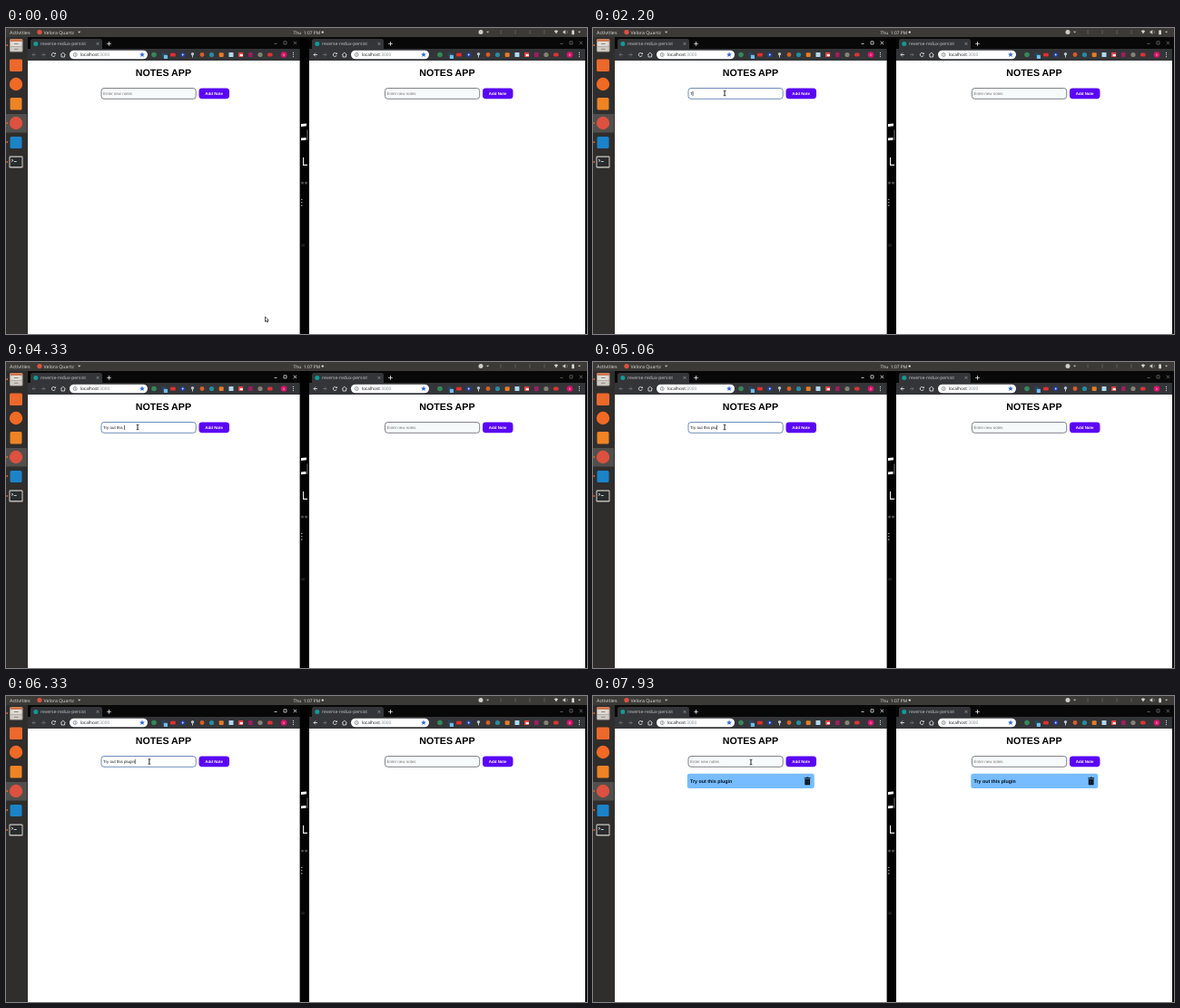
These frames come from a looping animation (640 by 338 pixels, 8000 ms). An HTML page with a canvas:

```html
<!DOCTYPE html>
<html lang="en">
<head>
<meta charset="utf-8">
<title>Notes app</title>
<style>
html, body { margin: 0; width: 100%; height: 100%; overflow: hidden; background: #000; }
canvas { display: block; width: 100vw; height: 100vh; }
</style>
</head>
<body>
<canvas id="stage"></canvas>
<script>
const W = 640, H = 338, LOOP = 8000;
const canvas = document.getElementById('stage');
const ctx = canvas.getContext('2d');
const UI = '"Noto Sans", sans-serif';
const PAGE = '"Liberation Sans", Arial, sans-serif';

const NOTE = 'Try out this plugin';
const KEYS = [2200, 2400, 2600, 2730, 3000, 3130, 3330, 3530, 3730, 3860,
  4000, 4130, 4260, 4600, 4800, 5060, 5400, 5800, 6130];
const FOCUS = 1200, ADDED = 7200;

// Pointer legs: start time, end time, from, to
const LEGS = [
  [60, 860, 285.5, 319, 145, 72],
  [6200, 6760, 145, 72, 238, 75.5],
  [7400, 7930, 238, 75.5, 174, 73]
];

function rect(x, y, w, h, color) {
  ctx.fillStyle = color;
  ctx.fillRect(x, y, w, h);
}

function round(x, y, w, h, r, fill, stroke, lw = 1) {
  ctx.beginPath();
  ctx.roundRect(x, y, w, h, r);
  if (fill) { ctx.fillStyle = fill; ctx.fill(); }
  if (stroke) { ctx.strokeStyle = stroke; ctx.lineWidth = lw; ctx.stroke(); }
}

function disc(x, y, r, color) {
  ctx.beginPath();
  ctx.arc(x, y, r, 0, Math.PI * 2);
  ctx.fillStyle = color;
  ctx.fill();
}

function arc(x, y, r, color, lw, from = 0, to = Math.PI * 2) {
  ctx.beginPath();
  ctx.arc(x, y, r, from, to);
  ctx.strokeStyle = color;
  ctx.lineWidth = lw;
  ctx.stroke();
}

function line(color, lw, ...p) {
  ctx.beginPath();
  for (let i = 0; i < p.length; i += 2) ctx.lineTo(p[i], p[i + 1]);
  ctx.strokeStyle = color;
  ctx.lineWidth = lw;
  ctx.stroke();
}

function poly(color, ...p) {
  ctx.beginPath();
  for (let i = 0; i < p.length; i += 2) ctx.lineTo(p[i], p[i + 1]);
  ctx.closePath();
  ctx.fillStyle = color;
  ctx.fill();
}

function outline(color, lw) {
  ctx.strokeStyle = color;
  ctx.lineWidth = lw;
  ctx.stroke();
}

function text(s, x, y, size, color, font = UI, weight = 400) {
  ctx.font = `${weight} ${size}px ${font}`;
  ctx.fillStyle = color;
  ctx.fillText(s, x, y);
  return ctx.measureText(s).width;
}

function topBar() {
  rect(0, 0, W, 10, '#3b3a36');
  text('Activities', 4, 6.5, 5.4, '#d6d4d0');
  disc(37, 4.6, 2.7, '#dc5140');
  text('Velora Quartz', 41.5, 6.5, 5.2, '#d6d4d0');
  poly('#c4c2bd', 79, 3.7, 82.4, 3.7, 80.7, 5.7);
  text('Thu  1:07 PM', 316.5, 6.5, 4.9, '#dedcd8');
  disc(348.8, 4.6, 1.2, '#dedcd8');
  disc(523, 4.5, 2.5, '#cfcdc8');
  poly('#c4c2bd', 529, 3.7, 532.2, 3.7, 530.6, 5.6);
  for (let x = 545; x < 595; x += 16) {
    line('#55544f', 0.7, x - 1, 3, x + 1, 6, x, 7, x, 2, x + 1, 3, x - 1, 6);
  }
  poly('#d2d0cb', 603.8, 3.2, 606, 2.2, 608.2, 3.2, 606, 6.6);
  poly('#d2d0cb', 613.5, 3.6, 614.7, 3.6, 616.3, 2.1, 616.3, 6.9, 614.7, 5.5, 613.5, 5.5);
  line('#a9a7a2', 0.6, 618, 3.2, 618.6, 4.5, 618, 5.8);
  round(623.2, 2.8, 2.8, 4.4, 0.5, '#d2d0cb');
  rect(624, 2, 1.2, 0.8, '#d2d0cb');
  poly('#c4c2bd', 630, 3.7, 633.2, 3.7, 631.6, 5.6);
}

function dock() {
  rect(0, 10, 24, H - 10, '#2f2e2d');
  rect(0, 95, 23, 20.5, '#514f4c');
  // file drawer
  round(4, 12, 14.5, 14.5, 1.5, '#a9a49c');
  rect(4.5, 12.5, 13.5, 2, '#e46b38');
  round(5, 15, 12.5, 5, 0.7, '#dedad4');
  round(5, 20.8, 12.5, 5, 0.7, '#d0cbc4');
  rect(9, 17, 4.5, 1, '#8c8780');
  rect(9, 22.8, 4.5, 1, '#8c8780');
  // launchers
  round(4, 34.5, 14, 13.5, 1.5, '#ec682b');
  disc(11, 62, 7.2, '#f06a24');
  round(4.5, 77, 13, 13.5, 1.5, '#ee8424');
  disc(11, 105, 7.2, '#dc5140');
  round(4.5, 120, 13, 13, 1.5, '#1c83c9');
  // terminal
  round(3.5, 141.5, 15, 13, 1.2, '#d5d2cd');
  rect(4.5, 142.7, 13, 10.5, '#292c2d');
  line('#eee', 0.8, 6, 145, 7.8, 146.3, 6, 147.6);
  rect(8.7, 147.2, 3, 0.8, '#eee');
  for (const y of [19, 105, 126, 148]) disc(1.2, y, 1, '#e2602c');
}

// Sliver of the window behind, visible between the two browsers
function gap() {
  rect(324, 10, 10, H - 10, '#020202');
  poly('#fff', 325, 106, 331, 105.5, 331, 108.3, 325, 109);
  poly('#fff', 325, 121.5, 330.5, 121, 330.5, 123.8, 325, 124.3);
  rect(331.6, 112.5, 0.8, 11.5, '#858585');
  line('#f4f4f4', 1.1, 327.6, 143, 327.6, 151.4, 332, 151.4);
  round(325, 169.8, 3, 2.8, 1, '#4a4a4a');
  round(329, 169.8, 3, 2.8, 1, '#4a4a4a');
  for (let y = 189.5; y < 198; y += 3.3) disc(325.8, y, 0.8, '#a9a9a9');
  rect(325, 238.5, 4, 3, '#1c1c1c');
}

function star(x, y, r, color) {
  ctx.beginPath();
  for (let i = 0; i < 10; i++) {
    const a = i * Math.PI / 5 - Math.PI / 2, q = i % 2 ? r * 0.45 : r;
    ctx.lineTo(x + q * Math.cos(a), y + q * Math.sin(a));
  }
  ctx.fillStyle = color;
  ctx.fill();
}

function extensions(d) {
  const y = 29.5;
  disc(163 + d, y, 2.8, '#35875a');
  round(171.5 + d, 27, 4, 4, 0.5, '#25455c');
  round(173.8 + d, 29.8, 4.2, 4.2, 0.6, '#6cbcf0');
  round(181 + d, 27.8, 5.8, 3.8, 0.8, '#df3030');
  disc(194.7 + d, y, 2.6, '#2440aa');
  disc(194.7 + d, y, 0.9, '#d6e0ff');
  disc(205.5 + d, 28.7, 1.7, '#b7c2cc');
  rect(205 + d, 29.5, 1, 3, '#b7c2cc');
  disc(216 + d, y, 2.4, '#d95d27');
  disc(226.5 + d, y, 2.6, '#278ba0');
  round(234.7 + d, 27.2, 5, 4.7, 1, '#e37d26');
  round(245.5 + d, 27, 5, 5, 0.6, '#b0d8ed');
  round(256 + d, 27, 5.2, 5, 0.6, '#e84444');
  rect(257.7 + d, 29, 3.1, 2.2, '#fff');
  round(267 + d, 27, 4.6, 5, 0.6, '#a01c5f');
  disc(280 + d, y, 2.6, '#868174');
  round(288 + d, 27.6, 5.6, 4, 1.5, '#dc3434');
}

function browser(right, active) {
  const d = right ? 310 : 0, e = right ? 315 : 0;
  const x0 = right ? 334 : 24, x1 = right ? 638 : 323.6;
  rect(x0, 10, x1 - x0, 13.5, '#080808');
  // tab
  round(27 + d, 12, 79, 13, [2.5, 2.5, 0, 0], '#343538');
  disc(32.8 + d, 17.4, 2.5, '#119b98');
  text('reverse-redux-persist', 38 + d, 19.3, 5, '#bfc1c4');
  line('#a8aaad', 0.6, 99.5 + d, 15.9, 102.5 + d, 18.9);
  line('#a8aaad', 0.6, 102.5 + d, 15.9, 99.5 + d, 18.9);
  line('#ededed', 0.8, 111.2 + d, 17.4, 115.8 + d, 17.4);
  line('#ededed', 0.8, 113.5 + d, 15.1, 113.5 + d, 19.7);
  // window buttons
  const c = active ? '#f2f2f2' : '#77787a';
  line(c, 0.8, 295.5 + e, 17.4, 298.5 + e, 17.4);
  round(306 + e, 14.8, 3, 3.2, 0, null, c, 0.7);
  line(c, 0.8, 316.7 + e, 14.8, 320 + e, 18.1);
  line(c, 0.8, 320 + e, 14.8, 316.7 + e, 18.1);
  // toolbar
  rect(x0, 23, x1 - x0, 13.2, '#343538');
  const back = right ? '#ececec' : '#707174';
  line(back, 0.8, 33 + d, 29.5, 29 + d, 29.5, 31 + d, 27.5);
  line(back, 0.8, 29 + d, 29.5, 31 + d, 31.5);
  line('#707174', 0.8, 39 + d, 29.5, 43 + d, 29.5, 41 + d, 27.5);
  line('#707174', 0.8, 43 + d, 29.5, 41 + d, 31.5);
  arc(52.3 + d, 29.5, 2, '#ececec', 0.8, 0.3, 5.4);
  poly('#ececec', 54.8 + d, 27, 54.8 + d, 29, 52.8 + d, 29);
  line('#ececec', 0.8, 60 + d, 29.7, 62.8 + d, 27.2, 65.6 + d, 29.7);
  line('#ececec', 0.8, 61 + d, 29.4, 61 + d, 32, 64.6 + d, 32, 64.6 + d, 29.4);
  // address bar
  round(70 + d, 24.7, 86, 9.6, 4.8, '#fff');
  arc(76.2 + d, 29.5, 2, '#5f6368', 0.6);
  rect(75.9 + d, 28.4, 0.6, 2.2, '#5f6368');
  const w = text('localhost', 81.7 + d, 31.2, 4.8, '#202124');
  text(':3000', 81.7 + d + w, 31.2, 4.8, '#8a8d91');
  star(150 + d, 29.5, 3, '#3166d8');
  extensions(e);
  disc(306 + e, 29.5, 3.3, '#d9146c');
  text('A', 304.8 + e, 30.9, 3.8, '#f6c7dc');
  for (let y = 27.4; y < 32; y += 2.1) disc(316.5 + e, y, 0.6, '#e4e4e4');
  rect(x0, 36, x1 - x0, H - 36, '#fff');
}

function trash(x, y) {
  rect(x - 1.2, y, 2.4, 1, '#08131e');
  rect(x - 3.4, y + 0.6, 6.8, 1.1, '#08131e');
  round(x - 2.9, y + 2.2, 5.8, 6.5, [0, 0, 0.9, 0.9], '#08131e');
  for (const k of [-1.4, 0, 1.4]) rect(x + k - 0.15, y + 3.3, 0.3, 4.3, '#365779');
}

function page(dx, value, focused, caret, added) {
  ctx.save();
  ctx.translate(dx, 0);
  text('NOTES APP', 142.8, 52.8, 10.67, '#000', PAGE, 700);
  round(105, 66.5, 104.2, 11.8, 3, focused ? '#fff' : '#f7fafb', focused ? '#4a70a8' : '#606369', 0.8);
  const w = text(value || 'Enter new notes', 107, 74, 4.45, value ? '#181818' : '#777', PAGE);
  if (caret) rect(107 + (value ? w : 0), 69.8, 0.6, 5.2, '#111');
  round(212.5, 66.6, 33.5, 11.6, 3.4, '#5a05f5');
  text('Add Note', 219.3, 74, 4.45, '#fff', PAGE, 700);
  if (added) {
    round(103.8, 85.7, 140, 16.4, 2.5, '#76bcff');
    text(NOTE, 107, 95.8, 5.33, '#07111b', PAGE, 700);
    trash(236.2, 89.6);
  }
  ctx.restore();
}

function pointerAt(t) {
  let pos = [LEGS[0][2], LEGS[0][3]];
  for (const [a, b, x, y, u, v] of LEGS) {
    if (t < a) break;
    const p = Math.min(1, (t - a) / (b - a));
    const k = p * p * (3 - 2 * p);
    pos = [x + (u - x) * k, y + (v - y) * k];
  }
  return pos;
}

function pointer(t) {
  const [x, y] = pointerAt(t);
  const inside = (a, b) => x > a && x < b && y > 66 && y < 79;
  ctx.save();
  ctx.translate(x, y);
  if (inside(105, 209)) {
    line('#111', 0.9, 0, -2.7, 0, 2.7);
    line('#111', 0.7, -1.4, -2.7, 1.4, -2.7);
    line('#111', 0.7, -1.4, 2.7, 1.4, 2.7);
  } else if (inside(212.5, 246)) {
    poly('#fff', 0, 0, 1, 0, 1.2, 2, 3.8, 2.8, 3.6, 5.2, 2.8, 6.2, 0.4, 6.2, -1.3, 3.7, -0.9, 3, 0, 3.7);
    outline('#111', 0.6);
  } else {
    poly('#fff', 0, 0, 0, 5.4, 1.3, 4.3, 2.1, 6.1, 3, 5.7, 2.2, 3.9, 3.9, 3.8);
    outline('#111', 0.7);
  }
  ctx.restore();
}

function draw(t) {
  const typed = KEYS.filter(k => k <= t).length;
  const added = t >= ADDED;
  const focused = t >= FOCUS && !added;
  const since = typed ? KEYS[typed - 1] : FOCUS;
  const caret = focused && (t - since) % 1000 < 500;
  rect(0, 0, W, H, '#080808');
  gap();
  browser(false, t >= FOCUS);
  browser(true, false);
  topBar();
  dock();
  page(0, added ? '' : NOTE.slice(0, typed), focused, caret, added);
  page(312.5, '', false, false, added);
  pointer(t);
}

function resize() {
  const s = window.devicePixelRatio || 1;
  canvas.width = Math.round(innerWidth * s);
  canvas.height = Math.round(innerHeight * s);
  ctx.setTransform(canvas.width / W, 0, 0, canvas.height / H, 0, 0);
  ctx.textRendering = 'geometricPrecision';
}

const start = performance.now();
function tick() {
  draw((performance.now() - start) % LOOP);
  requestAnimationFrame(tick);
}
addEventListener('resize', resize);
resize();
tick();
</script>
</body>
</html>
```
